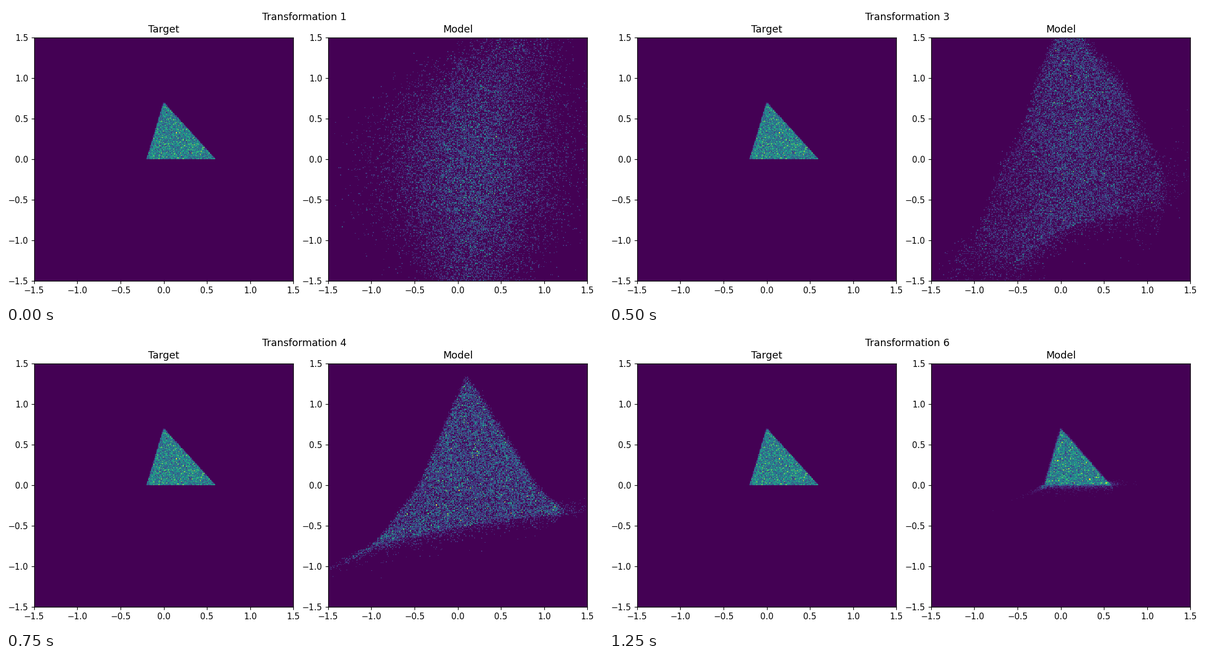
These frames come from a looping animation (1058 px wide and 529 px high, 1500 ms). A matplotlib script:

```python
import numpy as np
import matplotlib.pyplot as plt
from matplotlib.animation import FuncAnimation

W, H, DPI = 1058, 529, 105.8
COUNT, BINS, LIM = 25000, 300, 1.5
PEAKS = [6, 7, 7, 7, 11, 20]

plt.rcParams["font.family"] = "DejaVu Sans"
rng = np.random.default_rng(7)
edges = np.linspace(-LIM, LIM, BINS + 1)


def above(v, limit):
    return np.maximum(v - limit, 0)


def triangle(n, left, right, top):
    """Uniform points in a triangle with its base on y=0 and apex on x=0."""
    h = 1 - np.sqrt(rng.random(n))
    x = (left + (right - left) * rng.random(n)) * (1 - h)
    return x, top * h


def fitted_cloud():
    """Sharp triangle with haze under its base and a thin tail at each end."""
    x, y = triangle(COUNT - 1300, -0.19, 0.575, 0.7)
    x = x + rng.normal(0, 0.007, x.size)
    y = y + rng.normal(0, 0.004, y.size)
    hx = -0.23 + 0.83 * rng.random(950) ** 1.2
    hy = -rng.exponential(0.026, hx.size)
    t = rng.exponential(0.08, 130)
    s = rng.exponential(0.06, 220)
    tail = -0.01 - 0.5 * t + rng.normal(0, 0.015, t.size)
    tip = 0.02 + rng.normal(0, 0.016, s.size)
    return (np.concatenate([x, hx, -0.18 - t, 0.52 + s]),
            np.concatenate([y, hy, tail, tip]))


def wide_cloud():
    """Broad tilted bell, cut off towards the upper left."""
    y = rng.normal(-0.1, 0.87, COUNT)
    x = rng.normal(0.17 + 0.2 * above(y, 0) ** 2,
                   np.maximum(0.5 - 0.09 * y * y, 0.3))
    keep = y < 1.4 + 0.5 * x + rng.normal(0, 0.1, COUNT)
    return x[keep], y[keep]


# Each step scales and shifts one coordinate by an amount set by the other.
def stretch_y(x, y):
    return x, 2.8 * y - 0.62 + 0.72 * x - 0.45 * x ** 2


def widen_x(x, y):
    scale = 2.3 + 0.3 * np.exp(-((y + 0.3) / 0.2) ** 2)
    return scale * x - 0.17 + 0.2 * y - 0.45 * above(-y, 0) ** 2, y


def shear_y(x, y):
    scale = 1.45 + 2.7 * (x - 0.2) ** 2
    shift = 0.95 * (x - 0.15) ** 2 + 3.7 * above(-x, 0.3) ** 2 - 0.1
    return x, scale * y + shift


def spread_x(x, y):
    scale = 1.05 + (y - 0.2) ** 2
    return scale * x + above(y, 1.05) + 4 * above(-y, 0.68), y


def density(cloud):
    return np.histogram2d(*cloud, bins=[edges, edges])[0].T


def flow():
    """Unfold the fitted triangle step by step, then play it in reverse."""
    clouds = [fitted_cloud()]
    for step in (stretch_y, widen_x, shear_y, spread_x):
        clouds.append(step(*clouds[-1]))
    clouds.append(wide_cloud())
    return [density(c) for c in reversed(clouds)]


def panel(ax, title, grid, peak):
    ax.set_title(title)
    mesh = ax.pcolormesh(edges, edges, grid, cmap="viridis",
                         vmin=0, vmax=peak)
    ax.set_xlim(-LIM, LIM)
    ax.set_ylim(-LIM, LIM)
    return mesh


grids = flow()
fig, (left, right) = plt.subplots(1, 2, figsize=(W / DPI, H / DPI), dpi=DPI)
heading = fig.suptitle("Transformation 1")
fig.tight_layout()  # margins come from the still empty axes

panel(left, "Target", density(triangle(COUNT, -0.2, 0.6, 0.7)), PEAKS[-1])
model = panel(right, "Model", grids[0], PEAKS[0])


def update(i):
    heading.set_text(f"Transformation {i + 1}")
    model.set_array(grids[i])
    model.set_clim(0, PEAKS[i])
    return heading, model


anim = FuncAnimation(fig, update, frames=len(grids), interval=250,
                     repeat=True, repeat_delay=0, blit=False)
plt.show()
```
